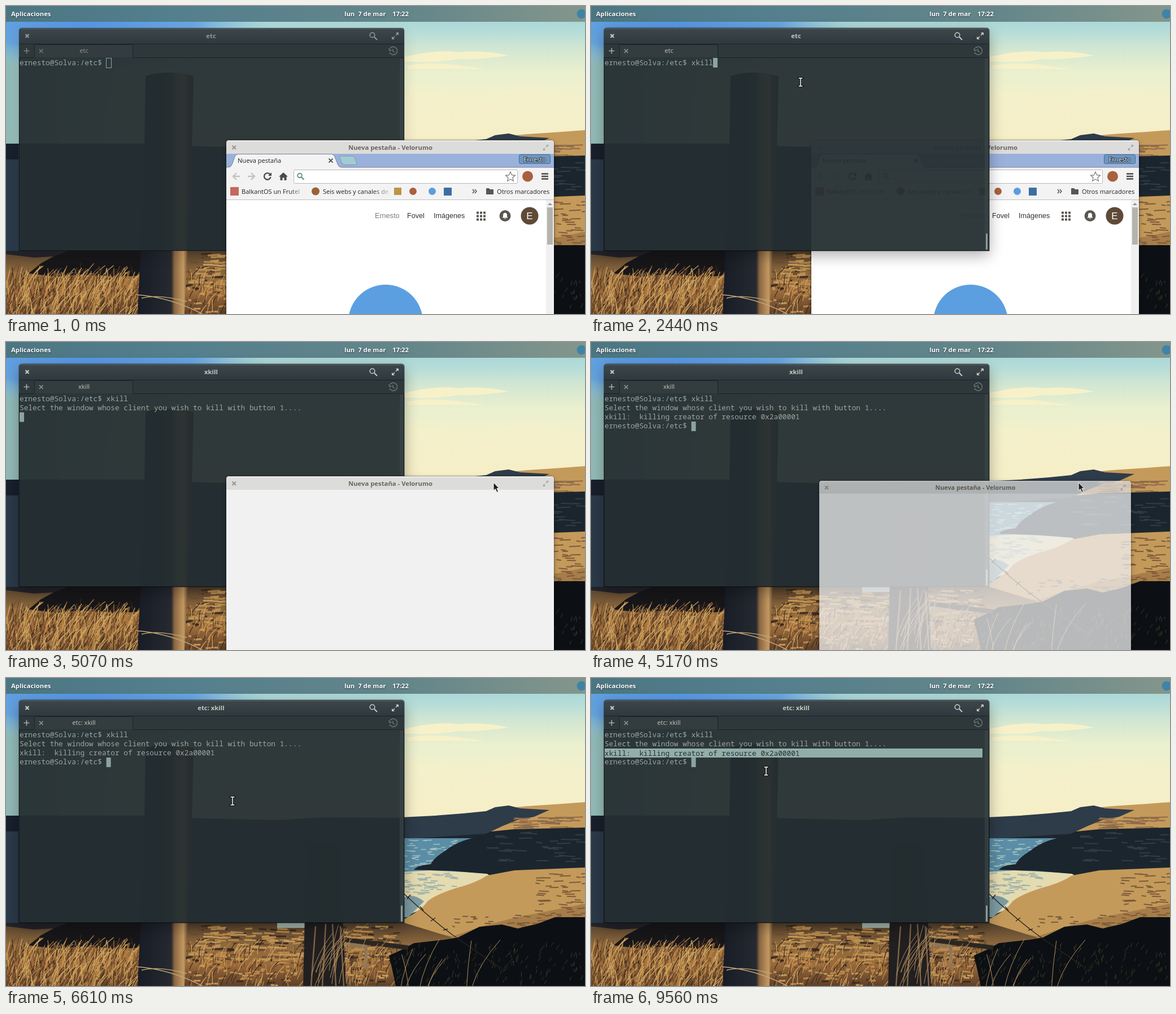
Write an HTML page that moves like this. It is 1025 px wide and 546 px high and loops after 9660 ms.

```html
<!DOCTYPE html>
<html lang="es">
<head>
<meta charset="utf-8">
<title>Escritorio</title>
<style>
html, body { margin: 0; width: 100%; height: 100%; overflow: hidden; background: #1c262e; }
#stage { position: relative; width: 1025px; height: 546px; overflow: hidden; }
.layer { position: absolute; inset: 0; width: 1025px; height: 546px; }
svg { display: block; }
text { font: 11.1px "Open Sans", "Noto Sans", sans-serif; white-space: pre; }
.bold { font-weight: 700; font-size: 11.3px; }
.mid { text-anchor: middle; }
.web { font: 12.6px "Liberation Sans", Arial, sans-serif; }
.box { position: absolute; }
#termShadow { left: 23px; top: 39px; width: 682px; height: 395px; border-radius: 5px 5px 0 0;
  box-shadow: 0 8px 26px rgba(0, 0, 0, .32), 0 0 0 1px rgba(0, 0, 0, .3); }
#webShadow { left: 390px; top: 238px; width: 580px; height: 328px; border-radius: 5px 5px 0 0;
  box-shadow: 0 3px 9px rgba(0, 0, 0, .35), 0 0 0 1px rgba(0, 0, 0, .25); }
#browser { transform-origin: 680px 402px; }
#terminal { z-index: 2; }
#pointer { z-index: 5; }
#console, #picked { margin: 0; font: 12.8px/16.33px "Noto Sans Mono", "DejaVu Sans Mono", monospace; white-space: pre; }
#console { position: absolute; left: 24px; top: 91.5px; color: #9ba69f; }
#picked { position: absolute; left: 24px; top: 124.5px; width: 669px; height: 16.33px; background: #92aea9; color: #263033; }
#caret, #hollow { position: absolute; left: 24px; top: 92px; width: 8px; height: 16.5px; box-sizing: border-box; }
#caret { background: #8ca39f; }
#hollow { left: 177px; width: 10px; height: 18px; border: 1px solid #8ca39f; }
</style>
</head>
<body>
<div id="stage">

<svg class="layer" viewBox="0 0 1025 546">
  <defs>
    <linearGradient id="sky" x2="0" y2="1">
      <stop offset="0" stop-color="#9fd2da"/><stop offset=".17" stop-color="#b4dcd8"/><stop offset=".3" stop-color="#d3e7d2"/>
      <stop offset=".45" stop-color="#eaf0cf"/><stop offset=".65" stop-color="#f4f0cb"/><stop offset="1" stop-color="#f6eec6"/>
    </linearGradient>
    <radialGradient id="blue">
      <stop offset="0" stop-color="#5596e6"/><stop offset=".6" stop-color="#5f9fe4" stop-opacity=".85"/><stop offset="1" stop-color="#8cc8e2" stop-opacity="0"/>
    </radialGradient>
    <linearGradient id="haze">
      <stop offset="0" stop-color="#7fb0b4" stop-opacity=".85"/><stop offset="1" stop-color="#9cc8c4" stop-opacity="0"/>
    </linearGradient>
    <linearGradient id="field" x2="0" y2="1">
      <stop offset="0" stop-color="#54402d"/><stop offset=".35" stop-color="#8f6a3e"/><stop offset=".65" stop-color="#9a6a3b"/><stop offset="1" stop-color="#5e4029"/>
    </linearGradient>
    <linearGradient id="post">
      <stop offset="0" stop-color="#171c26"/><stop offset=".6" stop-color="#262930"/><stop offset=".66" stop-color="#8a6641"/>
      <stop offset=".82" stop-color="#c49a62"/><stop offset=".9" stop-color="#6b4c33"/><stop offset="1" stop-color="#2f2824"/>
    </linearGradient>
    <linearGradient id="panel">
      <stop offset="0" stop-color="#4c7682"/><stop offset=".3" stop-color="#547f8d"/><stop offset=".7" stop-color="#64868a"/><stop offset="1" stop-color="#84968c"/>
    </linearGradient>
  </defs>
  <rect width="1025" height="260" fill="url(#sky)"/>
  <rect width="330" height="260" fill="url(#haze)"/>
  <ellipse cx="140" cy="24" rx="330" ry="90" fill="url(#blue)"/>
  <g fill="#f7f1c9">
    <path d="M700 92Q760 76 800 82Q850 78 890 88Q830 96 800 94Q760 102 705 98Z"/>
    <path d="M708 106Q750 98 800 105Q830 108 850 113Q790 110 712 112Z"/>
    <path d="M850 152Q920 146 985 156Q920 160 850 152Z" opacity=".7"/>
    <path d="M715 148Q780 152 860 182Q780 172 715 170Z" opacity=".6"/>
  </g>
  <path d="M0 244H320V248L480 252L560 247L720 248V444H0Z" fill="#2b3a49"/>
  <rect y="244" width="22" height="28" fill="#18202d"/>
  <path d="M870 232L925 227L985 223L1025 220V272H850Z" fill="#c49a5b"/>
  <path d="M700 247L760 244L810 240L850 236L866 229L890 226L910 231L962 234L935 246L905 252L880 262L850 276L700 286Z" fill="#2e3b49"/>
  <path id="slope" stroke="#8f6b49" stroke-width="2"/>
  <path d="M700 284H840V345H700Z" fill="#5b8ea6"/>
  <path id="waves" stroke="#a4c2c0" stroke-width="1.500"/>
  <path d="M700 344L750 341L850 346L862 354L790 388L700 425Z" fill="#e4dbb0"/>
  <path id="foam" stroke="#9fb3ab" stroke-width="2"/>
  <path d="M700 392Q718 378 740 396L712 424H700Z" fill="#7d9ca3"/>
  <path d="M700 430Q736 412 746 396Q760 384 798 372Q830 364 852 350L900 341L1025 336V470H680Z" fill="#c49a5b"/>
  <path d="M705 434L760 452L790 458L850 438L905 424L1025 400V440L780 470H690Z" fill="#a77d49"/>
  <path id="dunes" stroke="#7b5b3a" stroke-width="2"/>
  <path d="M722 340Q728 332 752 330Q758 318 778 306Q800 288 838 281L860 272L900 268L1025 265V330L960 330L900 340L850 347L790 342Z" fill="#1b252d"/>
  <path id="rocks" stroke="#2f3d47" stroke-width="2"/>
  <path d="M0 434H690L705 434L790 460L700 546H0Z" fill="url(#field)"/>
  <g id="tufts" stroke-width="3"></g>
  <path d="M480 434H532V443H480Z" fill="#a7b8ad"/>
  <path d="M40 474L62 456L84 444L100 434H240V478L200 480L130 476L90 480Z" fill="#17171a"/>
  <path d="M0 434H110L84 444L50 446L0 440Z" fill="#22242a"/>
  <g id="grass" fill="none" stroke-width="1.2"></g>
  <path d="M690 546L684 518L678 492L700 482L722 470L776 464L800 460L838 441L878 437L906 444L940 436L972 424L1025 424V546Z" fill="#0c1014"/>
  <path id="brush" stroke="#3d3a26" fill="none"/>
  <path d="M600 461L640 474V516H634V480L600 474Z" fill="#8f7454"/>
  <path d="M600 464L712 478" stroke="#2b2622" stroke-width="8"/>
  <path d="M247 124Q285 112 332 124L328 300L316 546H233L244 300Z" fill="url(#post)"/>
  <path d="M532 294Q560 286 590 296L602 546H526Z" fill="#211f20"/>
  <path d="M548 440L540 546M566 436L560 546M578 436L584 546M592 440L598 546" stroke="#7d6447" stroke-width="2.500"/>
  <g fill="none" stroke="#2a241e" stroke-width="1.4">
    <path d="M325 308Q355 335 370 360M440 350L535 305M592 322L705 383Q750 425 790 455L872 512"/>
    <path d="M710 392l6-8M733 405l6 7M752 431l8-6M774 447l8-2"/>
    <path d="M232 512Q290 516 348 546M240 518Q270 510 320 524" stroke="#c2a87a"/>
  </g>
  <path id="stalks" stroke="#b08a5a" fill="none"/>
  <rect width="1025" height="28" fill="url(#panel)"/>
  <g fill="#fff" style="filter:drop-shadow(0 1px 1px #0009)">
    <text class="bold" x="9" y="18">Aplicaciones</text>
    <text class="bold" x="599" y="18">lun  7 de mar</text>
    <text class="bold" x="684" y="18">17:22</text>
  </g>
  <circle cx="1019" cy="14" r="8.5" fill="#3f84a6"/>
</svg>

<div class="layer" id="terminal">
  <div class="box" id="termShadow"></div>
  <svg class="layer" viewBox="0 0 1025 546">
    <defs>
      <linearGradient id="bar" x2="0" y2="1"><stop offset="0" stop-color="#3d474b"/><stop offset="1" stop-color="#2e393f"/></linearGradient>
    </defs>
    <rect x="23" y="91" width="682" height="343" fill="#242e31" fill-opacity=".945"/>
    <path d="M23 68V44Q23 39 28 39H700Q705 39 705 44V68Z" fill="url(#bar)"/>
    <path d="M26 40.5H702" stroke="#566267"/>
    <rect x="23" y="67" width="682" height="24" fill="#2e3739"/>
    <path d="M50.5 91V70Q50.5 68.500 53 68.500H222Q224.500 68.500 224.500 71V91" fill="#333c3e" stroke="#1c2427"/>
    <path d="M23 67.500H705M23 91.500H50M225 91.500H705" stroke="#1b2326"/>
    <rect x="697" y="92" width="7" height="341" fill="#39464a" fill-opacity=".6"/>
    <rect x="699" y="403" width="3" height="29" rx="1.500" fill="#8c9c99"/>
    <path d="M23.500 91V433.500H704.500V91" fill="none" stroke="#12181a"/>
    <g id="termTools" fill="none" stroke="#c9cfc5" stroke-width="2">
      <path d="M34.500 50l6 6m0-6l-6 6"/>
      <circle cx="648.500" cy="51.500" r="4.300" stroke-width="1.500"/><path d="M652 55l5 5"/>
      <path d="M690 52l4-4m-10 10l4-4" stroke-width="1.600"/>
      <path d="M690 47h5v5zM683 54v5h5z" fill="#c9cfc5" stroke="none"/>
      <path d="M36.500 74.500v10m-5-5h10" stroke="#9fb0ac" stroke-width="1.600"/>
      <path d="M59 76.500l6.500 6.500m0-6.500l-6.500 6.500" stroke="#8d9896" stroke-width="1.600"/>
      <g class="mid" fill="#c6c8bc" stroke="none">
        <g data-show="0 2760"><text class="bold" x="363" y="57">etc</text><text x="138" y="83">etc</text></g>
        <g data-show="2760 5210"><text class="bold" x="363" y="57">xkill</text><text x="138" y="83">xkill</text></g>
        <g data-show="5210 9660"><text class="bold" x="363" y="57">etc: xkill</text><text x="138" y="83">etc: xkill</text></g>
      </g>
    </g>
    <path d="M680 75a7 7 0 1 1-1 7M678 75l1 4 4-1M685 76v4l3 2" fill="none" stroke="#6d7776" stroke-width="1.500"/>
  </svg>
  <pre id="console">ernesto@Solva:/etc$ <span data-show="1740 9660">x</span><span data-show="1860 9660">k</span><span data-show="2050 9660">i</span><span data-show="2260 9660">l</span><span data-show="2440 9660">l</span>
<span data-show="2710 9660">Select the window whose client you wish to kill with button 1....</span>
<span data-show="5160 9660">xkill:  killing creator of resource 0x2a00001
ernesto@Solva:/etc$</span></pre>
  <div id="hollow" data-show="0 920"></div>
  <div id="caret" data-show="920 1490 1740 3260 3835 4410 4980 5570 6110 6700 7270 7850 8410 8990 9560 9660"></div>
  <pre id="picked">xkill:  killing creator of resource 0x2a00001</pre>
</div>

<div class="layer" id="browser">
  <div class="box" id="webShadow"></div>
  <svg class="layer" viewBox="0 0 1025 546" overflow="visible">
    <defs>
      <linearGradient id="fade"><stop offset="0" stop-color="#f2f2f2" stop-opacity="0"/><stop offset="1" stop-color="#f2f2f2"/></linearGradient>
    </defs>
    <path d="M390 566V243Q390 238 395 238H965Q970 238 970 243V566Z" fill="#f1f1f1"/>
    <path d="M390 262V243Q390 238 395 238H965Q970 238 970 243V262Z" fill="#dcdcdb"/>
    <path d="M394 239.500H966" stroke="#f3f3f3"/>
    <text class="bold mid" x="680.500" y="255" fill="#6b665d">Nueva pestaña - Velorumo</text>
    <path d="M400.500 247.500l6.500 6.500m0-6.500l-6.500 6.500" stroke="#95938e" stroke-width="1.800"/>
    <path d="M956 250l3-3m-8 8l3-3" stroke="#a3a19c" stroke-width="1.500"/>
    <path d="M956 246h4v4zM951 252v4h4z" fill="#a3a19c"/>
    <g data-show="0 5030">
      <rect x="390" y="262" width="580" height="24" fill="#9ab1dc"/>
      <path d="M390 286.500H396Q399 285 401 279L405 267Q407 262.500 411 262.500H575Q580 262.500 582 267L587 280Q589 286 594 286.500H970V344H390Z" fill="#f3f3f3"/>
      <path d="M390 286Q398 286 401 279L405 267Q407 262.500 411 262.500H575Q580 262.500 582 267L587 280Q589 286 596 286H970" fill="none" stroke="#71809f"/>
      <path d="M590 267.500Q590 266 593 266H613Q616 266 617 268L621 279Q622 281.500 619 281.500H599Q596 281.500 595 279Z" fill="#a3cbd2" stroke="#7c96b4"/>
      <text x="410" y="277.500" fill="#222">Nueva pestaña</text>
      <path d="M571.500 270.500l7 7m0-7l-7 7" stroke="#555" stroke-width="1.800"/>
      <rect x="908.500" y="263.500" width="55" height="16" rx="2" fill="#6f97c0" stroke="#456a94"/>
      <text class="mid" x="936" y="275.500" fill="#fff" stroke="#2a4058" stroke-width="2" paint-order="stroke">Ernesto</text>
      <g fill="none" stroke="#c3c3c3" stroke-width="2.400">
        <path d="M414 302h-12m6-6l-6 6 6 6M428 302h12m-6-6l6 6-6 6"/>
        <path d="M467.500 298.500a5.800 5.800 0 1 0 1 4.500" stroke="#4c4a47"/>
      </g>
      <path d="M464 301h6v-6zM483 302.500l8-7.500 8 7.500h-2.500v6.500h-4v-4.500h-3v4.500h-4v-6.500z" fill="#4c4a47"/>
      <rect x="509.500" y="290.500" width="396" height="24" rx="2" fill="#fff" stroke="#b9b9b9"/>
      <circle cx="520" cy="300.500" r="3.800" fill="none" stroke="#6c9690" stroke-width="2"/>
      <path d="M523 303.500l4.500 4.500" stroke="#6c9690" stroke-width="2.400"/>
      <path d="M893 294l2.500 5.700 6 .6-4.600 4 1.400 6-5.300-3.200-5.300 3.200 1.400-6-4.600-4 6-.6z" fill="none" stroke="#777" stroke-width="1.200"/>
      <circle cx="923.500" cy="302" r="9.500" fill="#a9603f"/>
      <path d="M948 297.500h12M948 302h12M948 306.500h12" stroke="#4c4a47" stroke-width="2.500"/>
      <rect x="397" y="321" width="15" height="15" fill="#c4685c"/>
      <text x="417" y="332.500" fill="#222">BalkantOS un Frutel</text>
      <rect x="502" y="320" width="30" height="18" fill="url(#fade)"/>
      <circle cx="548" cy="328.500" r="7" fill="#9a6238"/>
      <text x="561" y="332.500" fill="#222">Seis webs y canales de</text>
      <rect x="650" y="320" width="34" height="18" fill="url(#fade)"/>
      <rect x="687" y="322" width="13" height="13" fill="#bd9448"/>
      <circle cx="720.500" cy="328.500" r="6.500" fill="#a9603f"/>
      <circle cx="754.500" cy="328.500" r="6.500" fill="#5b9de0"/>
      <rect x="775" y="322" width="14" height="14" fill="#3c6ea0"/>
      <path d="M826 325l3 3.500-3 3.500m4-7l3 3.500-3 3.500" fill="none" stroke="#444" stroke-width="1.300"/>
      <path d="M850 324q0-1 1-1h4l2 2h5q1 0 1 1v8h-13z" fill="#5a5650"/>
      <text x="869" y="332.500" fill="#222">Otros marcadores</text>
      <rect x="390" y="343" width="580" height="223" fill="#fff"/>
      <path d="M390 343.500H970" stroke="#bdbdbd"/>
      <text class="web" x="653" y="376" fill="#807c76">Ernesto</text>
      <text class="web" x="710" y="376" fill="#333">Fovel</text>
      <text class="web" x="757" y="376" fill="#333">Imágenes</text>
      <path d="M833 366.500h16m-16 6h16m-16 6h16" stroke="#5a5650" stroke-width="4" stroke-dasharray="4 2"/>
      <circle cx="883.500" cy="372" r="10" fill="#5a5650"/>
      <path d="M879 375.500v-1l1-1v-3q0-3.500 3.500-4 3.500.5 3.500 4v3l1 1v1zM882 376.500h3l-1.500 1.500z" fill="#fff"/>
      <circle cx="927" cy="372" r="15.500" fill="#5f4a36"/>
      <text class="web mid" x="927" y="378" fill="#fff" style="font-size:17px">E</text>
      <circle cx="672" cy="560" r="66" fill="#5b9fe0"/>
      <rect x="956" y="344" width="14" height="222" fill="#f0f0f0"/>
      <path d="M959 353l4-4 4 4z" fill="#8f8f8f"/>
      <rect x="958" y="357" width="10" height="66" fill="#b4b3ae"/>
    </g>
  </svg>
</div>

<svg class="layer" id="pointer" viewBox="0 0 1025 546">
  <g id="mouse">
    <path data-show="430 520 4980 5755" d="M0 0V14.500L3.300 11.500L6 17.500L8.500 16.300L6 10.500H10Z" fill="#1d1d1d" stroke="#fff"/>
    <g data-show="520 2800 5755 9660" fill="none">
      <path d="M-3.500 -7H3.500M0 -7V7M-3.500 7H3.500" stroke="#111" stroke-width="3.600" stroke-linecap="square"/>
      <path d="M-3.500 -7H3.500M0 -7V7M-3.500 7H3.500" stroke="#fff" stroke-width="1.500"/>
    </g>
    <g data-show="2800 4980" fill="none" stroke-linecap="round">
      <path d="M-6 -6L6 6M6 -6L-6 6" stroke="#fff" stroke-width="4.500"/>
      <path d="M-6 -6L6 6M6 -6L-6 6" stroke="#1d1d1d" stroke-width="2.500"/>
    </g>
  </g>
</svg>
</div>

<script>
const LOOP = 9660, COL = 7.68, ROW = 16.33;
const $ = id => document.getElementById(id);

// rows: [time, value, easing to the next row]
function play(el, prop, rows) {
  const frames = rows.map(([t, v, easing = 'step-end']) => ({ offset: t / LOOP, [prop]: v, easing }));
  const last = frames[frames.length - 1];
  if (last.offset < 1) frames.push({ ...last, offset: 1 });
  el.animate(frames, { duration: LOOP, iterations: Infinity });
}

// Seeded strokes for the landscape
let seed = 7;
const rnd = (a, b) => {
  seed = (seed * 16807) % 2147483647;
  return +(a + (b - a) * seed / 2147483647).toFixed(1);
};
const draw = (n, stroke) => Array.from({ length: n }, stroke).join('');
const blades = (n, x0, x1, y0, y1, len) => draw(n, () => {
  const h = rnd(len / 2, len), lean = rnd(-0.2, 0.9) * h;
  return `M${rnd(x0, x1)} ${rnd(y0, y1)}q${lean / 4} ${-h / 2} ${lean} ${-h}`;
});
const dabs = (n, x0, x1, y0, y1, len) => draw(n, () =>
  `M${rnd(x0, x1)} ${rnd(y0, y1)}l${rnd(len / 3, len)} ${rnd(-1.5, 1.5)}`);
const layers = (colours, shape) => colours.map(c => `<path stroke="${c}" d="${shape()}"/>`).join('');

$('tufts').innerHTML = layers(['#3a2c22', '#c49a5b', '#6e4d2f', '#b98a4c'], () =>
  dabs(75, 318, 680, 440, 500, 24) + dabs(45, 318, 680, 490, 546, 14));
$('grass').innerHTML = layers(['#c4914f', '#3b2a1f', '#b07c40', '#6b472b', '#d0a45f'], () =>
  blades(140, 0, 235, 488, 570, 34) + blades(60, 318, 690, 480, 570, 24));
$('stalks').setAttribute('d', blades(24, 540, 640, 500, 560, 100) + blades(8, 660, 860, 546, 560, 90));
$('brush').setAttribute('d', blades(150, 685, 1020, 475, 546, 9));
$('slope').setAttribute('d', dabs(34, 890, 1010, 246, 266, 34));
$('waves').setAttribute('d', dabs(60, 700, 800, 286, 338, 16));
$('foam').setAttribute('d', dabs(40, 700, 790, 346, 384, 18));
$('dunes').setAttribute('d', dabs(45, 930, 1020, 345, 425, 22) + dabs(40, 790, 1020, 420, 445, 14));
$('rocks').setAttribute('d', dabs(35, 850, 1010, 275, 325, 26));

for (const el of document.querySelectorAll('[data-show]')) {
  const times = el.dataset.show.split(' ').map(Number);
  const rows = times.map((t, i) => [t, i % 2 ? 'hidden' : 'visible']);
  if (times[0] > 0) rows.unshift([0, 'hidden']);
  play(el, 'visibility', rows);
}

// Focus change, raise, and closing of the browser
play($('termShadow'), 'opacity', [[0, .4], [920, .52], [970, .64], [1025, .76], [1080, .88], [1130, 1]]);
play($('termTools'), 'opacity', [[0, .65], [970, 1]]);
play($('browser'), 'zIndex', [[0, 3], [920, 1], [4980, 3]]);
play($('browser'), 'transform', [[0, 'scale(1)'], [5120, 'scale(1)', 'linear'], [5330, 'scale(.8)']]);
play($('browser'), 'opacity', [[0, 1], [5120, 1, 'linear'], [5330, 0]]);

// Text caret: [time, column, row]
play($('caret'), 'transform', [
  [0, 20, 0], [1740, 21, 0], [1860, 22, 0], [2050, 23, 0], [2260, 24, 0], [2440, 25, 0], [2710, 0, 2], [5160, 20, 3]
].map(([t, c, r]) => [t, `translate(${c * COL}px, ${r * ROW}px)`]));

// Left edge of the selection: [time, column]
play($('picked'), 'clipPath', [
  [0, 88], [7450, 46], [7500, 43], [7550, 38], [7600, 31], [7650, 24], [7700, 17], [7760, 10], [7820, 5], [7880, 1], [7930, 0]
].map(([t, c]) => [t, `inset(0 0 0 ${c * COL}px)`]));

// Pointer: [time, x, y], moving in small jumps
const path = [
  [0, 1000, 338], [430, 1000, 330], [610, 371, 135], [3190, 371, 135], [3700, 620, 262], [3930, 790, 316],
  [4120, 853, 254], [4410, 863, 256], [4980, 863, 249], [5570, 863, 249], [6110, 401, 218], [6610, 401, 218],
  [7090, 388, 137], [7410, 388, 137], [7600, 207, 138], [7800, 70, 142], [8060, 5, 149], [8270, 7, 137],
  [8670, 7, 137], [9150, 310, 165]
];
const jumpy = [430, 3190, 3700, 3930, 4120, 5570, 6610, 7410, 7600, 7800, 8670];
play($('mouse'), 'transform', path.map(([t, x, y], i) => {
  const next = path[i + 1];
  const ease = jumpy.includes(t) ? `steps(${Math.round((next[0] - t) / 45)}, end)` : 'step-end';
  return [t, `translate(${x}px, ${y}px)`, ease];
}));
</script>
</body>
</html>
```
